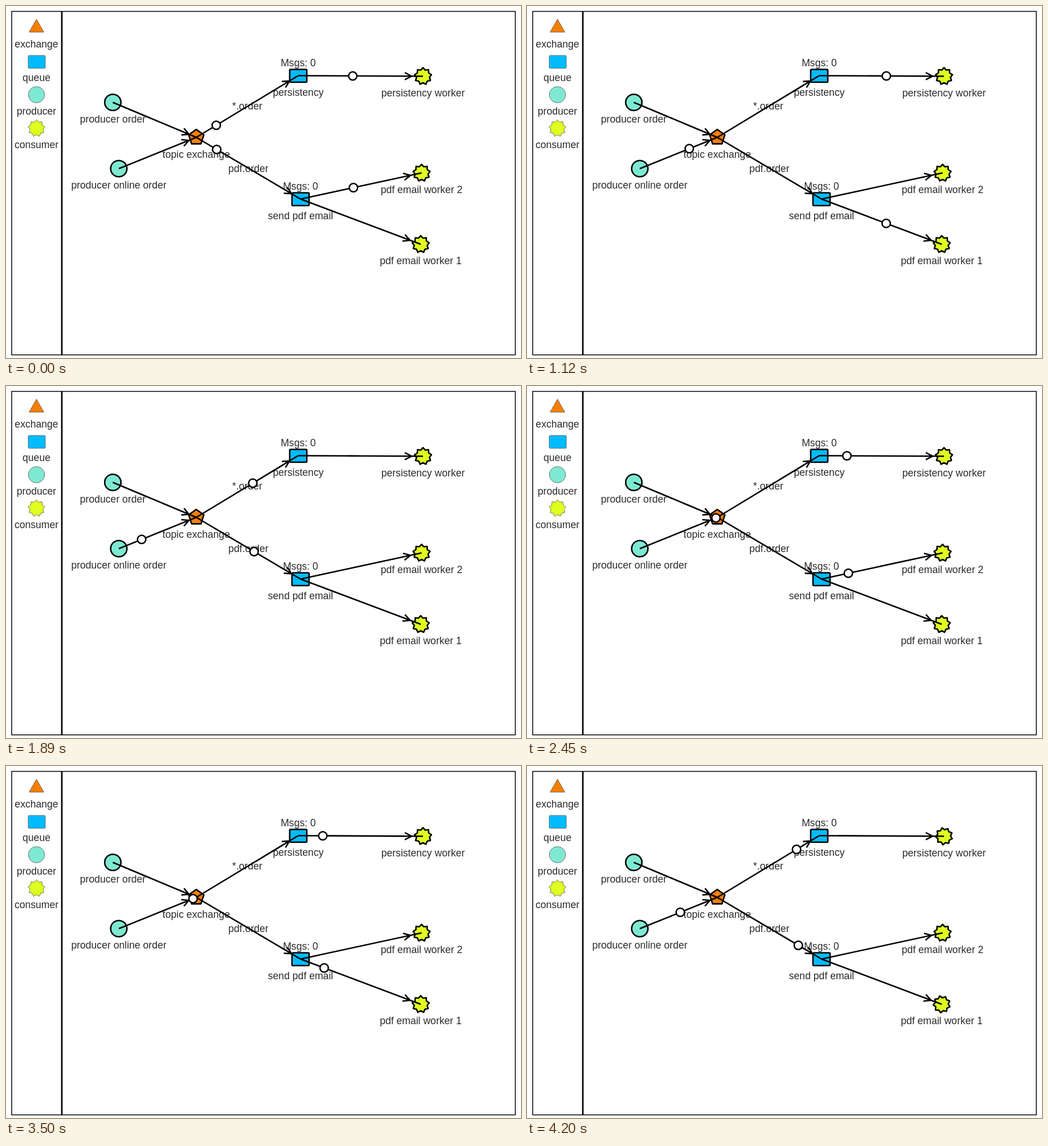
An HTML page that plays this animation: 904x619 px, repeating every 4.27 s.

```html
<!DOCTYPE html>
<html lang="en">
<head>
<meta charset="utf-8">
<title>Topic exchange</title>
<style>
  html, body { margin: 0; width: 100%; height: 100%; overflow: hidden; background: #fff; }
  svg { display: block; }
  text { font: 17.6px "Liberation Sans", Arial, sans-serif; fill: #2b2b2b; text-anchor: middle; }
  .node { stroke: #000; stroke-width: 2.6; stroke-linejoin: round; }
  .key { stroke: #555; stroke-width: .8; }
  .edge { stroke: #000; stroke-width: 2.6; fill: none; }
  .message { stroke: #000; stroke-width: 2.5; fill: #fff; }
</style>
</head>
<body>
<svg id="stage" width="904" height="619" viewBox="0 0 904 619"></svg>
<script>
const LOOP = 4270, STEP = 70, TEETH = 9;
const stage = document.getElementById('stage');
const colors = { exchange: '#f57f06', queue: '#00bcff', producer: '#7ee9d3', consumer: '#dfff1f' };

// gap: distance from the node's centre to an incoming arrow tip
const nodes = {
  order:    { kind: 'producer', x: 187.5, y: 169.5, label: 'producer order', dy: 35 },
  online:   { kind: 'producer', x: 198, y: 286, label: 'producer online order', dy: 35 },
  exchange: { kind: 'exchange', x: 334, y: 231, label: 'topic exchange', dy: 36, gap: 14 },
  store:    { kind: 'queue', x: 513, y: 122.5, label: 'persistency', dy: 35, gap: 18 },
  mail:     { kind: 'queue', x: 517, y: 339.5, label: 'send pdf email', dy: 35, gap: 18.5 },
  storer:   { kind: 'consumer', x: 732, y: 123.5, label: 'persistency worker', dy: 35.5, gap: 20 },
  mailer2:  { kind: 'consumer', x: 729.5, y: 293.5, label: 'pdf email worker 2', dy: 35.5, gap: 20 },
  mailer1:  { kind: 'consumer', x: 728, y: 419, label: 'pdf email worker 1', dy: 35, gap: 20 },
};

const edges = [
  ['order', 'exchange'], ['online', 'exchange'],
  ['exchange', 'store'], ['exchange', 'mail'],
  ['store', 'storer'], ['mail', 'mailer2'], ['mail', 'mailer1'],
];

// Each leg: departure and arrival in ms, then the edges travelled together
const toExchange = [['online', 'exchange']];
const toQueues = [['exchange', 'store'], ['exchange', 'mail']];
const toWorkers = mailer => [['store', 'storer'], ['mail', mailer]];
const legs = [
  [-357, 460, toWorkers('mailer2')],
  [-160, 657, toQueues],
  [588, 1421, toExchange],
  [680, 1498, toWorkers('mailer1')],
  [1437, 2254, toQueues],
  [1650, 2464, toExchange],
  [2262, 3110, toWorkers('mailer2')],
  [2502, 3319, toQueues],
  [2690, 3535, toExchange],
  [3345, 4133, toWorkers('mailer1')],
  [3565, 4382, toQueues],
  [3735, 4625, toExchange],
];

function add(tag, attrs, text) {
  const el = document.createElementNS('http://www.w3.org/2000/svg', tag);
  for (const name in attrs) el.setAttribute(name, attrs[name]);
  if (text) el.textContent = text;
  return stage.appendChild(el);
}

const label = (x, y, text) => add('text', { x, y }, text);

function ring(count, radius) {
  return Array.from({ length: count }, (_, i) => {
    const a = i / count * 2 * Math.PI - Math.PI / 2, r = radius(i);
    return `${(r * Math.cos(a)).toFixed(2)},${(r * Math.sin(a)).toFixed(2)}`;
  }).join(' ');
}

function shape(kind, x, y, className) {
  const attrs = { class: className, fill: colors[kind], transform: `translate(${x} ${y})` };
  if (kind === 'producer') return add('circle', { ...attrs, r: 14.3 });
  if (kind === 'queue') return add('rect', { ...attrs, x: -15, y: -11, width: 30, height: 22.5, rx: 1.5 });
  const points = kind === 'exchange' ? ring(5, () => 14) : ring(2 * TEETH, i => i % 2 ? 11.5 : 15);
  return add('polygon', { ...attrs, points });
}

function arrow(from, to) {
  const angle = Math.atan2(to.y - from.y, to.x - from.x);
  const point = (r, a) => [to.x - r * Math.cos(a), to.y - r * Math.sin(a)];
  const [tx, ty] = point(to.gap, angle);
  const arm = turn => `${tx - 13.5 * Math.cos(angle + turn)} ${ty - 13.5 * Math.sin(angle + turn)}`;
  add('path', {
    class: 'edge',
    d: `M${from.x} ${from.y}L${to.x} ${to.y}M${arm(.48)}L${tx} ${ty}L${arm(-.48)}`,
  });
}

// Frame and legend
add('rect', { x: 10, y: 9.5, width: 884, height: 604, fill: '#fff', stroke: '#000', 'stroke-width': 1.5 });
add('path', { d: 'M98 9V614', stroke: '#000', 'stroke-width': 2.7 });
add('polygon', { class: 'key', fill: colors.exchange, points: '53.5,23 40.5,46 66.5,46' });
shape('queue', 54, 98, 'key');
shape('producer', 53.5, 156, 'key');
shape('consumer', 53.5, 215, 'key');
['exchange', 'queue', 'producer', 'consumer'].forEach((kind, i) => label(53.5, 73 + 59 * i, kind));

// Network
for (const node of Object.values(nodes)) {
  node.el = shape(node.kind, node.x, node.y, 'node');
  label(node.x, node.y + node.dy, node.label);
  if (node.kind === 'queue') label(node.x, node.y - 17, 'Msgs: 0');
}
label(423.5, 182, '*.order');
label(425.5, 292, 'pdf.order');
for (const [from, to] of edges) arrow(nodes[from], nodes[to]);

const messages = legs.flatMap(([start, end, routes]) => routes.map(([from, to]) => ({
  start, end, from: nodes[from], to: nodes[to], el: add('circle', { class: 'message', r: 7.3 }),
})));

function render(time) {
  const t = Math.floor(time % LOOP / STEP) * STEP;
  for (const { start, end, from, to, el } of messages) {
    const p = (t - start) / (end - start);
    const moving = p >= 0 && p < 1;
    el.setAttribute('visibility', moving ? 'visible' : 'hidden');
    if (!moving) continue;
    el.setAttribute('cx', from.x + (to.x - from.x) * p);
    el.setAttribute('cy', from.y + (to.y - from.y) * p);
  }
  // A worker's gear advances one tooth when a message arrives
  for (const node of Object.values(nodes)) {
    if (node.kind !== 'consumer') continue;
    const hit = messages.find(m => m.to === node && t >= m.end && t < m.end + 100);
    const turn = hit ? (t - hit.end) / 100 * 360 / TEETH : 0;
    node.el.setAttribute('transform', `translate(${node.x} ${node.y}) rotate(${turn})`);
  }
}

const origin = performance.now();
function tick() {
  render(performance.now() - origin);
  requestAnimationFrame(tick);
}
tick();
</script>
</body>
</html>
```
